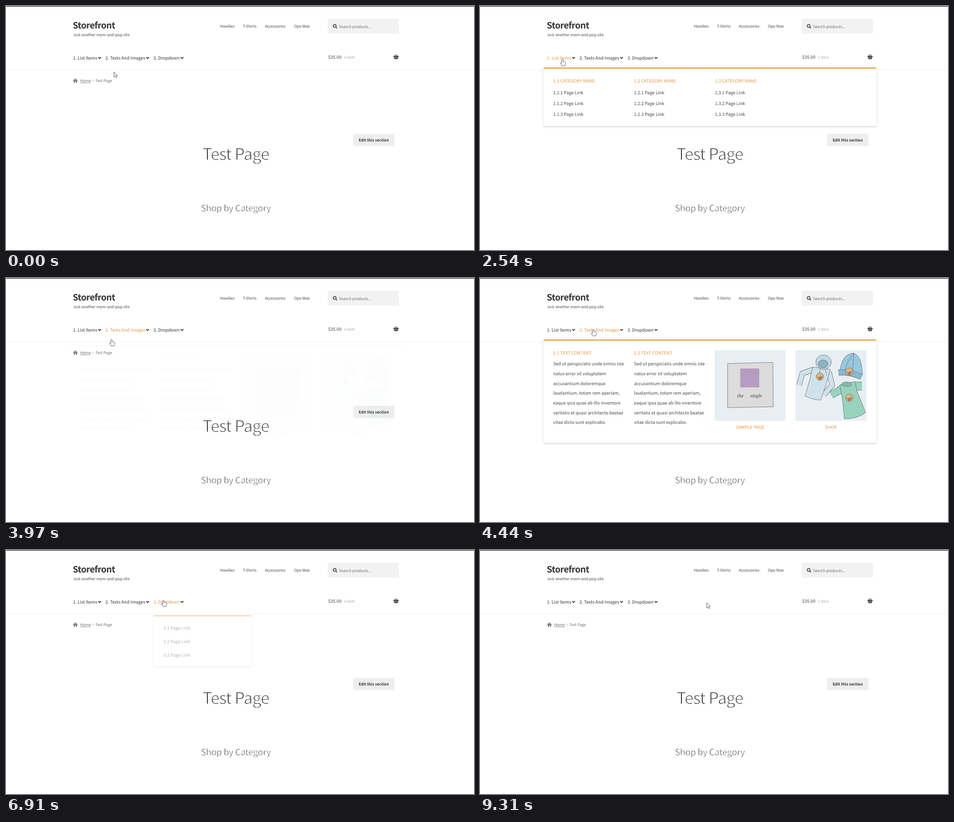
Write an HTML page that moves like this. It is 1034 px wide and 542 px high and loops after 9540 ms.

```html
<!DOCTYPE html>
<html lang="en">
<head>
<meta charset="utf-8">
<title>Storefront menu</title>
<style>
html, body { margin: 0; width: 100%; height: 100%; overflow: hidden; background: #fff; }
svg { display: block; width: 1034px; height: 542px; }
text {
  font: 9.69px "Noto Sans CJK JP", "Noto Sans CJK SC", "Noto Sans CJK KR", "Noto Sans CJK TC", "Noto Sans", sans-serif;
  fill: #43454b; text-rendering: geometricPrecision; white-space: pre;
}
.small { font-size: 8.48px; }
.muted { fill: #6d6d6d; }
.pale { fill: #a9a9ac; }
.dark { fill: #333; }
.mid { text-anchor: middle; }
.brand { font-size: 19.39px; font-weight: 700; letter-spacing: -.55px; fill: #333; }
.semi { font-weight: 600; fill: #333; }
.h1 { font-size: 35.9px; font-weight: 300; letter-spacing: -.4px; fill: #333; }
.h2 { font-size: 19.39px; font-weight: 300; fill: #333; }
.no-light .h1 { letter-spacing: -1.1px; stroke: #fff; stroke-width: 1.35px; }
.no-light .h2 { letter-spacing: -.25px; stroke: #fff; stroke-width: .8px; }
.accent, .item.on { fill: #e0963f; }
.link { text-decoration: underline; }
.sheet { fill: #fff; filter: drop-shadow(0 2px 2px rgba(0,0,0,.16)); }
.script { font: italic 9.5px "Noto Serif", serif; fill: #444; }
.ink { stroke: #6b6f72; stroke-width: .9; stroke-linejoin: round; }
.limb { fill: none; stroke-linejoin: round; }
.cursor { fill: #fff; stroke: #444; stroke-width: .9; stroke-linejoin: round; }
</style>
</head>
<body>
<svg id="stage" viewBox="0 0 1034 542" xmlns="http://www.w3.org/2000/svg">
  <rect width="1034" height="1.2" fill="#1d2025"/>
  <rect y="141.7" width="1034" height="1" fill="#f0f0f0"/>

  <text x="147.6" y="50.2" class="brand">Storefront</text>
  <text x="148" y="67.2" class="small">Just another mom-and-pop site</text>
  <text x="472.5" y="47.6" class="small">Hoodies<tspan dx="18.5">T-Shirts</tspan><tspan dx="18.5">Accessories</tspan><tspan dx="18.5">Opo Wae</tspan></text>

  <rect x="711" y="29.7" width="157" height="31.3" fill="#f2f2f2"/>
  <rect x="711" y="29.7" width="157" height="1" fill="#dedede"/>
  <g fill="none" stroke="#43454b" stroke-width="1.7">
    <circle cx="726.2" cy="44.3" r="3.1"/>
    <path d="M728.5 46.6l3 3"/>
  </g>
  <text x="736" y="48.6" class="small muted">Search products...</text>

  <g id="nav"></g>
  <text x="711.5" y="116.7">$35.00<tspan dx="5.5" class="small pale">1 item</tspan></text>
  <g fill="#222" stroke="#222">
    <path d="M856.3 111.6h11v1h-11z" stroke-width=".8"/>
    <path d="M857.7 113.7h8.4l-.8 4h-6.8z" stroke-width=".6"/>
    <path d="M858.7 111.5l2.2-3.6M865 111.5l-2.2-3.6" stroke-width="1.3"/>
    <path d="M859.9 114v2.7m2-2.7v2.7m2-2.7v2.7" stroke="#fff" stroke-width=".8"/>
  </g>

  <g fill="#6d6d6d">
    <path d="M148.3 166.2l5-4.3 5 4.3" fill="none" stroke="#6d6d6d" stroke-width="1.3"/>
    <path d="M149.8 166.5l3.5-3 3.5 3v3.7h-2.5v-2.6h-2v2.6h-2.5z"/>
    <path d="M191.4 163.9l1.9 2.2-1.9 2.2" fill="none" stroke="#aaa"/>
  </g>
  <text x="163.5" y="169.3" class="small muted"><tspan class="link">Home</tspan><tspan dx="10.2">Test Page</tspan></text>

  <rect x="767" y="284" width="91" height="27" fill="#eee"/>
  <text x="812.5" y="301.2" class="small semi mid">Edit this section</text>
  <text x="507.8" y="342.2" class="h1 mid">Test Page</text>
  <text x="508" y="455.5" class="h2 mid">Shop by Category</text>

  <g id="panels"></g>
  <path id="arrow" class="cursor" d="M.5.5v11.2l2.6-2.4 1.8 4 1.9-.8-1.8-3.9h3.4z"/>
  <path id="hand" class="cursor" d="M-1.5 1.2Q0-1 1.5 1.2V5Q6.3 5 7 7.2V10.3Q6.6 12.8 5.5 14.6H-.8Q-1.8 12-4.4 9.2-4.2 6.8-1.5 9z"/>
</svg>

<script>
const LOOP = 9540, FADE = 400, RISE = 13.5;
const $ = id => document.getElementById(id);
const text = (x, y, str, cls = '') => `<text x="${x}" y="${y}" class="${cls}">${str}</text>`;
const each = (list, fn) => list.map(fn).join('');
const smooth = v => (v = Math.min(1, Math.max(0, v)), v * v * (3 - 2 * v));

const probe = document.createElement('canvas').getContext('2d');
const family = getComputedStyle(document.querySelector('.h1')).fontFamily;
function measure(str, size, weight = 400) {
  probe.font = `${weight} ${size}px ${family}`;
  return probe.measureText(str).width;
}

// Thin the headings when no light weight is installed
if (measure('Test Page', 100, 300) === measure('Test Page', 100)) $('stage').classList.add('no-light');

// Navigation: each label is followed by a chevron, then a gap
let left = 148;
const items = ['1. List Items', '2. Texts And Images', '3. Dropdown'].map(label => {
  const x = left, end = x + measure(label, 9.69) + 9.3;
  left = end + 9;
  return { label, x, end };
});
$('nav').innerHTML = each(items, i => text(i.x, 118.5, i.label, 'item dark') +
  `<path d="M${i.end - 7} 113.6l3 3 3-3" fill="none" stroke="#222" stroke-width="1.7"/>`);

// Panels
const column = i => 161.7 + i * 178.6;
const panel = (x, w, bottom, body) => `<g class="panel" opacity="0">
  <rect class="sheet" x="${x}" y="137" width="${w}" height="${bottom - 137}" rx="3"/>
  <path d="M${x} 139q0-2.3 2.3-2.3h${w - 4.6}q2.3 0 2.3 2.3z" fill="#e2962f"/>${body}</g>`;

const lists = each([0, 1, 2], c =>
  text(column(c), 170.2, `1.${c + 1} CATEGORY NAME`, 'accent') +
  each([1, 2, 3], r => text(column(c), 171.2 + r * 24.4, `1.${c + 1}.${r} Page Link`)));

const lorem = ['Sed ut perspiciatis unde omnis iste', 'natus error sit voluptatem',
  'accusantium doloremque', 'laudantium, totam rem aperiam,', 'eaque ipsa quae ab illo inventore',
  'veritatis et quasi architecto beatae', 'vitae dicta sunt explicabo.'];
const prose = each([0, 1], c =>
  text(column(c), 170.2, `2.${c + 1} TEXT CONTENT`, 'accent') +
  each(lorem, (line, i) => text(column(c), 194.2 + i * 21.66, line)));

const links = each([1, 2, 3], r => text(347.8, 138.9 + r * 29.8, `3.${r} Page Link`));

// Drawings
const shape = (d, fill) => `<path class="ink" d="${d}" fill="${fill}"/>`;
const oval = (x, y, rx, ry, fill) => `<ellipse class="ink" cx="${x}" cy="${y}" rx="${rx}" ry="${ry}" fill="${fill}"/>`;
const limb = (d, width, fill) => `<path class="limb" d="${d}" stroke="#6b6f72" stroke-width="${width}"/>
  <path class="limb" d="${d}" stroke="${fill}" stroke-width="${width - 1.8}"/>`;
const badge = (x, y) => oval(x, y, 8.3, 8.3, '#e8b970') +
  shape(`M${x - 5} ${y + 1}q5 2 10-2-1 8-6 8z`, '#b77a63') + oval(x + 3, y - 3, 2, 2, '#fff');
const tile = (i, caption, art) =>
  `<rect x="${column(i) - .6}" y="160.5" width="156.7" height="156.7" fill="#e8eff3"/>${art}` +
  text(column(i) + 78, 335, caption, 'accent mid');

const poster = shape('M547 190l100-2.5 1 98.5-101 2z', '#dcdcdc') +
  '<rect x="575" y="201" width="42" height="42" fill="#b79cc1"/>' +
  text(568, 265, 'the', 'script') + text(597, 265, 'single', 'script');

const hoodie = limb('M738 203L712 212 705 238', 12, '#cfe2eb') +
  limb('M771 208L778 238 760 259', 12, '#cfe2eb') +
  shape('M735 198l39 5-10 35-11 33q-18 0-35-9l11-37z', '#cfe2eb') +
  oval(759, 187, 17, 16, '#c0dae6') + oval(758, 191, 11, 9, '#8eb1c1') +
  shape('M752 200l-3 16m14-13l3 14', 'none');
const hat = shape('M795 208Q800 167 826 167 844 174 845 215z', '#98c8de') +
  shape('M807 204Q812 182 826 167 824 186 823 207', 'none') +
  limb('M792 210Q818 208 843 220', 13, '#86b9d2');
const tee = limb('M800 246L776 260', 17, '#98d3be') + limb('M826 240H844', 19, '#98d3be') +
  shape('M795 237l33-7 6 24 18 45q-18 14-47 14l-4-43z', '#98d3be') +
  oval(810, 236, 11, 5, '#7fbda8');

const pictures = tile(2, 'SAMPLE PAGE', poster) +
  tile(3, 'SHOP', hoodie + hat + tee + badge(751, 219) + badge(816, 208) + badge(816, 266));

$('panels').innerHTML = panel(140, 736, 266.5, lists) +
  panel(140, 736, 366, prose + pictures) + panel(326, 217, 250, links);

// Pointer moves: start, duration, where to
const home = [238, 146];
const moves = [
  [80, 640, 191, 114], [2050, 90, 185, 116], [2460, 640, 115.5, 167],
  [3150, 780, 232, 138], [3930, 270, 250, 114], [5680, 480, 312, 93],
  [6160, 420, 322, 97], [6660, 340, 353, 114], [8350, 80, 358.5, 119],
  [8430, 400, 430, 101], [8830, 480, 500.5, 117]
];
// Panel, opens, closes
const visits = [[1, 290, 380], [0, 450, 2768], [1, 3930, 5928], [2, 6740, 8660]];

const pointer = t => moves.reduce(([x, y], [start, span, toX, toY]) => {
  const k = smooth((t - start) / span);
  return [x + (toX - x) * k, y + (toY - y) * k];
}, home);

const shown = (index, t) => Math.max(...visits.filter(v => v[0] === index).map(([, on, off]) =>
  smooth((Math.min(t, off) - on) / FADE) * (1 - smooth((t - off) / FADE))));

const panels = document.querySelectorAll('.panel');
const labels = document.querySelectorAll('.item');

function draw(t) {
  const [x, y] = pointer(t);
  const over = y > 98 && y < 137 ? items.findIndex(i => x >= i.x && x <= i.end) : -1;
  labels.forEach((el, i) => el.classList.toggle('on', i === over));
  panels.forEach((el, i) => {
    const a = shown(i, t);
    el.setAttribute('opacity', a);
    el.setAttribute('transform', `translate(0 ${RISE * (1 - a)})`);
  });
  const active = over < 0 ? 'arrow' : 'hand';
  for (const id of ['arrow', 'hand']) {
    $(id).setAttribute('visibility', id === active ? 'visible' : 'hidden');
    $(id).setAttribute('transform', `translate(${x} ${y})`);
  }
}

const start = performance.now();
function tick() {
  draw((performance.now() - start) % LOOP);
  requestAnimationFrame(tick);
}
tick();
</script>
</body>
</html>
```
